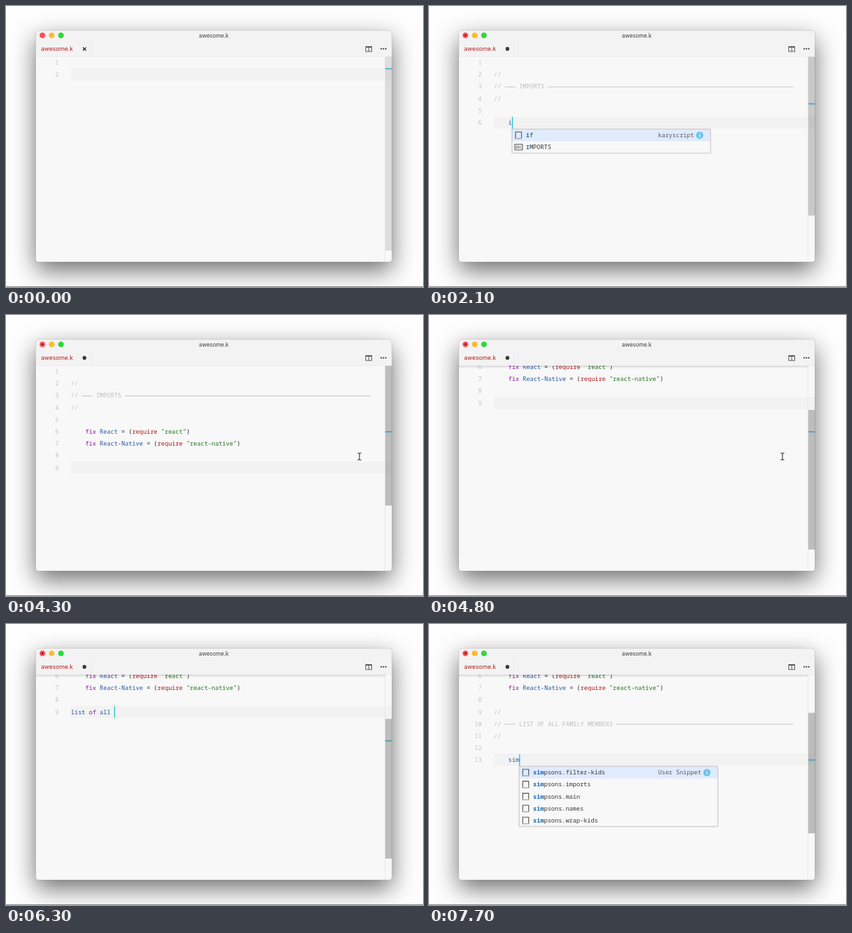
These frames come from a looping animation (630 by 426 pixels, 8 s). An HTML page with a canvas:

```html
<!DOCTYPE html>
<html lang="en">
<head>
<meta charset="utf-8">
<title>Editor snippets</title>
<style>
html, body { margin: 0; width: 100%; height: 100%; overflow: hidden; background: #fefefe; }
canvas { display: block; width: 630px; height: 426px; }
</style>
</head>
<body>
<canvas id="stage"></canvas>
<script>
const W = 630, H = 426, LOOP = 8000;
const WIN = { x: 45, y: 37, w: 538, h: 351 };
const TOP = 77, VIEW = 311, LINE = 18.18, LEFT = 98, CW = 5.45, RULER = 573;
const MONO = '"Noto Sans Mono", "DejaVu Sans Mono", monospace';
const SANS = 'Inter, "Open Sans", sans-serif';
const CODE_SIZE = 9.08;
const INK = { purple: '#8c1b9c', blue: '#2756a3', red: '#b01c1c', green: '#22741f', dark: '#2b2b2b', faint: '#bdbdbd' };

const CODE = ['fix React = (require "react")', 'fix React-Native = (require "react-native")'];
const SNIPPETS = ['filter-kids', 'imports', 'main', 'names', 'wrap-kids'].map(s => 'simpsons.' + s);
const KEYWORD = { rows: ['if'], match: 1, pick: 0, detail: 'karyscript' };
const KEYWORDS = { ...KEYWORD, rows: ['if', 'IMPORTS'] };
const WORDS = { rows: ['IMPORTS'], match: 2, pick: 0, detail: '' };
const snippets = (match, pick) => ({ rows: SNIPPETS, match, pick, detail: 'User Snippet' });

// Each step changes part of the editor state; n is the line count, and the last line is active.
const steps = [
  [0, { n: 2, text: '', indent: 0, caret: false, thumb: .19, scroll: 0, dirty: false, popup: null, mouse: false }],
  [200, { caret: true, thumb: .09 }],
  [300, { thumb: 0 }],
  [500, { caret: false }],
  [800, { caret: true }],
  [1100, { caret: false }],
  [1300, { caret: true, dirty: true, text: 'i', popup: KEYWORD }],
  [1400, { text: 'imp', popup: null }],
  [1500, { text: 'impor' }],
  [1600, { text: 'imports' }],
  [1800, { n: 6, text: '', indent: 4, thumb: .4 }],
  [2100, { text: 'i', popup: KEYWORDS, thumb: .32 }],
  [2200, { text: 'im', popup: WORDS, thumb: .22 }],
  [2300, { text: 'i', popup: KEYWORDS, thumb: .12 }],
  [2400, { text: '', popup: null, thumb: 0 }],
  [2500, { text: 's', popup: snippets(1, 0) }],
  [2700, { text: 'si', popup: snippets(2, 0) }],
  [2800, { text: 'sim', popup: snippets(3, 0) }],
  [3000, { popup: snippets(3, 1) }],
  [3100, { n: 7, text: CODE[1], popup: null, thumb: .4 }],
  [3300, { n: 8, text: '' }],
  [3400, { n: 9 }],
  [3500, { indent: 0 }],
  [3700, { caret: false, thumb: .32 }],
  [3800, { thumb: .2 }],
  [3900, { thumb: .1 }],
  [4000, { caret: true, thumb: 0 }],
  [4200, { thumb: .2 }],
  [4300, { caret: false, thumb: .4, mouse: true }],
  [4500, { scroll: 20, caret: true }],
  [4600, { scroll: 58 }],
  [4700, { scroll: 87 }],
  [4800, { scroll: 98, caret: false }],
  [5000, { caret: true }],
  [5200, { text: 'l', mouse: false }],
  [5400, { text: 'li' }],
  [5600, { text: 'lis' }],
  [5900, { text: 'list ' }],
  [6000, { text: 'list o' }],
  [6100, { text: 'list of ' }],
  [6200, { text: 'list of al' }],
  [6300, { text: 'list of all ' }],
  ...Array.from({ length: 7 }, (_, i) =>
    [6500 + i * 100, { text: 'list of all ' + 'family members'.slice(0, 2 * i + 2) }]),
  [7400, { n: 13, text: '', indent: 4 }],
  [7600, { text: 's', popup: snippets(1, 0) }],
  [7700, { text: 'sim', popup: snippets(3, 0) }]
];

const canvas = document.getElementById('stage');
const g = canvas.getContext('2d');
const ratio = window.devicePixelRatio || 1;
canvas.width = W * ratio;
canvas.height = H * ratio;
g.scale(ratio, ratio);

function stateAt(t) {
  const s = {};
  for (const [start, patch] of steps) if (start <= t) Object.assign(s, patch);
  return s;
}

function box(x, y, w, h, color) {
  g.fillStyle = color;
  g.fillRect(x, y, w, h);
}

function disc(x, y, r, color) {
  g.fillStyle = color;
  g.beginPath();
  g.arc(x, y, r, 0, Math.PI * 2);
  g.fill();
}

function path(points, color, width) {
  g.strokeStyle = color;
  g.lineWidth = width;
  g.beginPath();
  points.forEach(([x, y], i) => i ? g.lineTo(x, y) : g.moveTo(x, y));
  g.stroke();
}

function label(text, x, y, color, font, align = 'left') {
  g.font = font;
  g.fillStyle = color;
  g.textAlign = align;
  g.fillText(text, x, y);
}

// Monospaced text, given by the vertical centre of its line.
function mono(text, x, mid, color, { align = 'left', weight = 500 } = {}) {
  label(text, x, mid + 3.1, color, `${weight} ${CODE_SIZE}px ${MONO}`, align);
}

function tokenColor(word) {
  if (/^(fix|of)$/.test(word)) return INK.purple;
  if (word === 'require') return INK.red;
  if (word[0] === '"') return INK.green;
  return /^[a-z]/i.test(word) ? INK.blue : INK.dark;
}

function code(text, x, mid) {
  for (const m of text.matchAll(/"[^"]*"|[a-z-]+|\S/gi))
    mono(m[0], x + m.index * CW, mid, tokenColor(m[0]));
}

function section(title, first, midOf) {
  for (let i = 0; i < 3; i++) mono('//', LEFT, midOf(first + i), INK.faint);
  const mid = midOf(first + 1), end = 8 + title.length;
  mono(title, LEFT + 7 * CW, mid, INK.faint);
  box(LEFT + 3 * CW, mid - .2, 3 * CW, 1, '#c2c2c2');
  box(LEFT + end * CW, mid - .2, (83 - end) * CW, 1, '#c2c2c2');
}

function windowShape() {
  g.beginPath();
  g.roundRect(WIN.x, WIN.y, WIN.w, WIN.h, 4);
}

function drawFrame() {
  box(0, 0, W, H, '#fefefe');
  box(0, 425, W, 1, '#858585');
  g.save();
  g.shadowColor = 'rgba(0,0,0,.57)';
  g.shadowBlur = 36 * ratio;
  g.shadowOffsetY = 13 * ratio;
  g.fillStyle = '#f8f8f8';
  windowShape();
  g.fill();
  g.restore();
}

function drawHeader(s) {
  box(WIN.x, WIN.y, WIN.w, TOP - WIN.y, '#f3f3f3');
  box(WIN.x, TOP - 1, WIN.w, 1, '#ececec');
  box(128.5, 53, 1, 24, '#e9e9e9');
  ['#fb4f57', '#fdbb2f', '#2fd83c'].forEach((c, i) => disc(55 + i * 14, 44.5, 4.3, c));
  if (s.dirty) disc(55, 44.5, 1.4, '#7c0a10');
  label('awesome.k', 314, 47.7, '#3c3c3c', `8.35px ${SANS}`, 'center');
  label('awesome.k', 53, 68.2, '#b5201c', `9px ${SANS}`);
  if (s.dirty) {
    disc(118.5, 65, 2.9, '#3b3b3b');
  } else {
    path([[116.2, 62.7], [121, 67.5]], '#333', 1.6);
    path([[121, 62.7], [116.2, 67.5]], '#333', 1.6);
  }
  g.strokeStyle = '#555';
  g.lineWidth = 1;
  g.strokeRect(543.5, 61.5, 9, 7.5);
  box(543, 61, 10, 2, '#555');
  box(547.5, 61, 1, 8, '#555');
  for (let i = 0; i < 3; i++) disc(566.8 + i * 3.5, 65, 1.15, '#444');
}

function drawEditor(s, midOf) {
  const active = midOf(s.n);
  box(LEFT, active - LINE / 2, 485, LINE, '#f2f2f2');
  for (let i = 1; i <= s.n; i++)
    mono(String(i), 79.7, midOf(i), '#c3c3c3', { align: 'right', weight: 400 });
  if (s.n >= 6) section('IMPORTS', 2, midOf);
  if (s.n >= 7) CODE.forEach((line, i) => code(line, LEFT + 4 * CW, midOf(6 + i)));
  if (s.n >= 13) section('LIST OF ALL FAMILY MEMBERS', 9, midOf);
  if (s.n !== 7) code(s.text, LEFT + s.indent * CW, active);
}

function drawRuler(s) {
  const content = VIEW + (s.n - 1) * LINE, k = VIEW / content;
  box(RULER - 1, TOP, 1, VIEW, '#e9e9e9');
  box(RULER, TOP + (s.n - 1) * LINE * k, 10, 2, '#50c8e8');
  box(RULER, TOP + s.scroll * k, 10, VIEW * k, `rgba(100,100,100,${s.thumb})`);
}

function snippetIcon(x, y) {
  path([[x, y + 9], [x, y], [x + 9, y], [x + 9, y + 9]], '#4c4c4c', 1.1);
  for (let i = 0; i < 5; i++) box(x - .5 + i * 2.2, y + 9.3, 1.2, 1.2, '#4c4c4c');
}

function wordIcon(x, y) {
  g.strokeStyle = '#4c4c4c';
  g.lineWidth = 1;
  g.strokeRect(x - 1, y + .5, 11.5, 8.5);
  label('abc', x + 4.75, y + 6.8, '#444', `5.6px ${SANS}`, 'center');
}

function drawPopup(p, x, y) {
  const h = p.rows.length * LINE;
  g.save();
  g.shadowColor = 'rgba(0,0,0,.14)';
  g.shadowBlur = 3 * ratio;
  box(x, y, 300, h, '#f8f8f8');
  g.restore();
  p.rows.forEach((row, i) => {
    const top = y + i * LINE, mid = top + LINE / 2;
    if (i === p.pick) {
      box(x, top, 300, LINE, '#e0ebfe');
      if (p.detail) {
        mono(p.detail, x + 275, mid, '#5a5a5a', { align: 'right' });
        disc(x + 283.5, mid + .2, 5.5, '#6cc4ec');
        box(x + 283, mid - 1, 1.2, 4, '#fff');
        box(x + 283, mid - 3, 1.2, 1.2, '#fff');
      }
    }
    (row === 'IMPORTS' ? wordIcon : snippetIcon)(x + 5.3, mid - 4.8);
    mono(row.slice(0, p.match), x + 21, mid, '#1a69b5', { weight: 700 });
    mono(row.slice(p.match), x + 21 + p.match * CW, mid, '#383838');
  });
  g.strokeStyle = '#c6c6c6';
  g.lineWidth = 1;
  g.strokeRect(x, y, 300, h);
}

function drawMouse(x, y) {
  for (const [color, width] of [['#fff', 2.4], ['#222', 1.1]]) {
    path([[x, y - 4.5], [x, y + 4.5]], color, width);
    for (const d of [-1, 1])
      path([[x - 2.7, y + d * 5.5], [x, y + d * 4.5], [x + 2.7, y + d * 5.5]], color, width);
  }
}

function draw(t) {
  const s = stateAt(t);
  const midOf = line => 86 + (line - 1) * LINE - s.scroll;
  const mid = midOf(s.n), caretX = LEFT + (s.indent + s.text.length) * CW;
  drawFrame();
  g.save();
  windowShape();
  g.clip();
  drawHeader(s);
  g.beginPath();
  g.rect(WIN.x, TOP, WIN.w, VIEW);
  g.clip();
  drawEditor(s, midOf);
  if (s.caret) box(caretX, mid - LINE / 2, 1.5, LINE, '#25ccd5');
  drawRuler(s);
  if (s.scroll) {
    const shade = g.createLinearGradient(0, TOP, 0, TOP + 4);
    shade.addColorStop(0, 'rgba(0,0,0,.13)');
    shade.addColorStop(1, 'rgba(0,0,0,0)');
    box(WIN.x, TOP, RULER - WIN.x, 4, shade);
  }
  if (s.popup) drawPopup(s.popup, caretX + .2, mid + LINE / 2 + .7);
  g.restore();
  g.strokeStyle = 'rgba(0,0,0,.16)';
  g.lineWidth = .7;
  windowShape();
  g.stroke();
  if (s.mouse) drawMouse(534, 214.5);
}

let origin = null;
function tick(now) {
  origin ??= now;
  draw((now - origin) % LOOP);
  requestAnimationFrame(tick);
}
draw(0);
requestAnimationFrame(tick);
</script>
</body>
</html>
```
